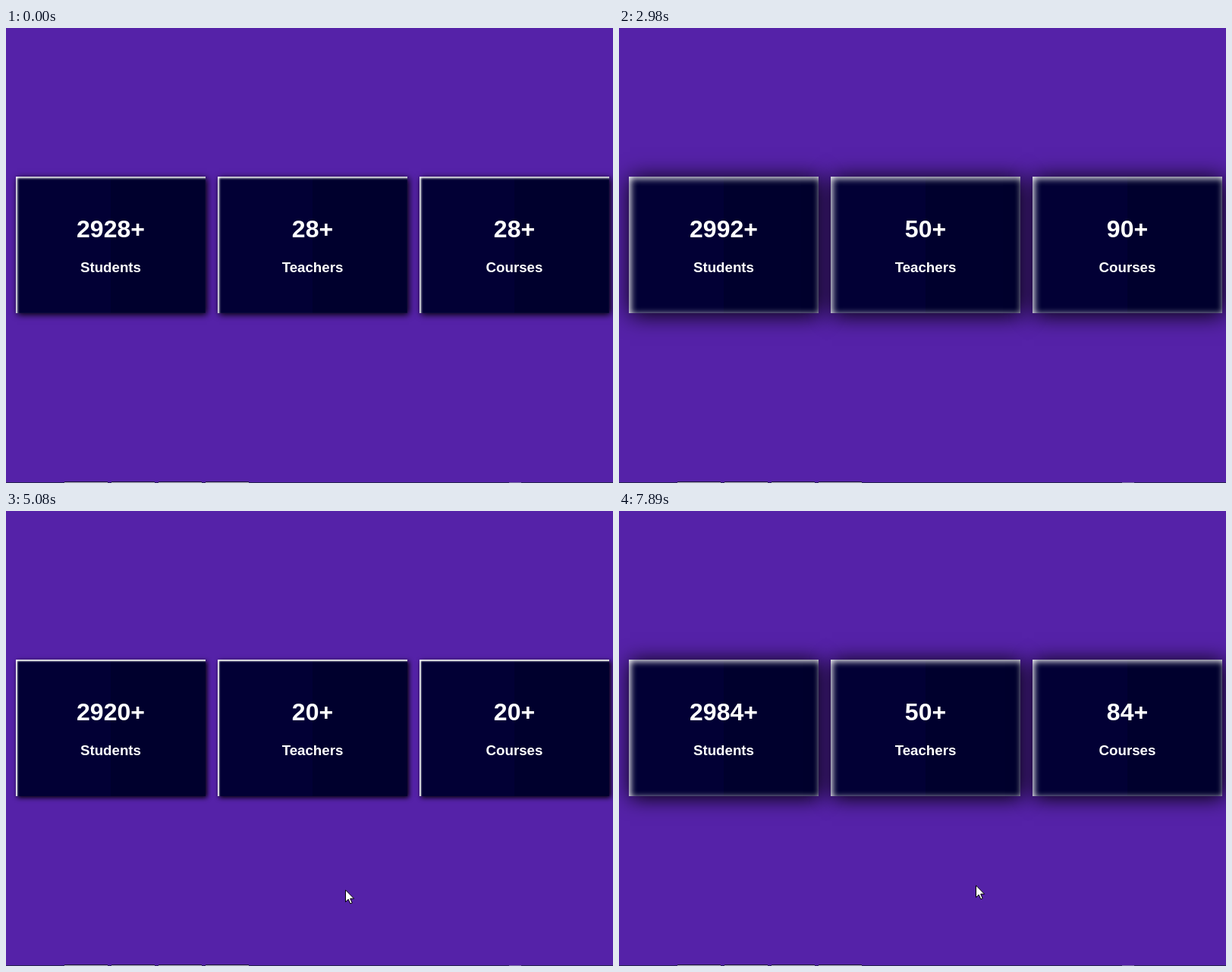
Write an HTML page that moves like this. It is 800 px wide and 600 px high and loops after 8 s.

```html
<!DOCTYPE html>
<html lang="en">
<head>
<meta charset="utf-8">
<title>Counter cards</title>
<style>
  html, body { margin: 0; width: 100%; height: 100%; overflow: hidden; background: #5522a8; }
  #stage { position: relative; width: 800px; height: 600px; overflow: hidden; background: #5522a8; }
  #stage > * { position: absolute; }
  .card {
    top: 196px; width: 250px; height: 180px;
    background: linear-gradient(90deg, #020035 50%, #00002d 50%);
    color: #fff; text-align: center;
    font-family: "Liberation Sans", Arial, sans-serif; font-weight: bold;
  }
  .card div { position: absolute; left: 0; width: 100%; }
  .num { top: 51px; font-size: 32px; line-height: 37px; }
  .label { top: 109px; font-size: 18.72px; line-height: 21px; }
  #menu {
    left: 660px; top: 327px; width: 160px; padding: 3px 0;
    border: 1px solid #bdbdc4; background: #fff; color: #222;
    box-shadow: 2px 2px 3px rgba(0, 0, 0, .45);
    font: 11.4px/24px "Open Sans", "Noto Sans", sans-serif;
  }
  #menu div { height: 24px; padding-left: 24px; white-space: nowrap; }
  #menu .off { color: #a0a0a0; }
  #menu .hover { background: #dadce0; }
  #menu hr { margin: 5px 0; border: 0; height: 1px; background: #e6e6ea; }
  #ring { width: 24px; height: 24px; border-radius: 50%; background: rgba(240, 232, 50, .78); }
  #bar { left: 0; top: 599px; width: 800px; height: 1px; background: #26264e; }
  .tab { top: 598px; width: 57px; height: 1px; background: #1c1838; border-bottom: 1px solid #b4b2c6; }
</style>
</head>
<body>
<div id="stage">
  <div id="bar"></div>
  <div id="menu">
    <div class="off">Back</div>
    <div class="off">Forward</div>
    <div id="reload">Reload</div>
    <hr>
    <div>Save as...</div>
    <div>Print...</div>
    <div>Cast...</div>
    <div>Translate to English</div>
    <hr>
    <div>View page source</div>
    <div>Inspect</div>
  </div>
  <div id="ring"></div>
  <svg id="cursor" width="14" height="21" viewBox="0 0 14 21">
    <path d="M.5 .8V16.5L4.2 13L6.8 18.8L9.2 17.8L6.7 12.1H11.6Z" fill="#fff" stroke="#000"/>
  </svg>
</div>
<script>
const LOOP = 8000, RELOAD = 4250;
const $ = id => document.getElementById(id);
const stage = $('stage'), menu = $('menu'), reload = $('reload');
const ring = $('ring'), cursor = $('cursor');

// [time, progress of the count]
const COUNT = [
  [0, 28.5], [1610, 64.5], [2980, 92.5], [3360, 100], [RELOAD - 1, 100],
  [RELOAD, 0], [4300, 0], [5080, 20.5], [5990, 40.5], [7890, 84.5], [LOOP, 86]
];
// [time, x, y]
const PATH = [
  [3000, 800, 540], [3180, 735, 430], [3360, 660, 327], [3640, 660, 327],
  [3780, 700, 350], [3950, 744, 397], [4150, 744, 397], [4450, 690, 455],
  [4800, 545, 517], [5080, 447, 499], [5300, 452, 521], [5600, 466, 505],
  [5800, 470, 493], [LOOP, 470, 493]
];

function sample(keys, t) {
  let i = 1;
  while (i < keys.length - 1 && t >= keys[i][0]) i++;
  const a = keys[i - 1], b = keys[i];
  const k = Math.min(1, Math.max(0, (t - a[0]) / (b[0] - a[0])));
  return a.slice(1).map((v, j) => v + (b[j + 1] - v) * k);
}

function add(cls, x, html = '') {
  const el = document.createElement('div');
  el.className = cls;
  el.style.left = x + 'px';
  el.innerHTML = html;
  stage.insertBefore(el, menu);
  return el;
}

for (let i = 0; i < 4; i++) add('tab', 77 + i * 62);
add('tab', 663).style.cssText += 'width:16px;background:none;border-color:#77739a';

const cards = [['Students', 2900, 3000], ['Teachers', 0, 50], ['Courses', 0, 90]]
  .map(([label, from, to], i) => {
    const el = add('card', 13 + i * 266,
      `<div class="num"></div><div class="label">${label}</div>`);
    return { el, num: el.firstChild, from, to };
  });

const show = (el, on) => { el.style.display = on ? '' : 'none'; };
const place = (el, x, y) => { el.style.transform = `translate(${x}px, ${y}px)`; };
const within = (t, a, b) => t >= a && t < b;

function draw(t) {
  const [p] = sample(COUNT, t);
  const n = Math.floor(p / 2) * 2;
  const shadow = `2px 2px ${p * .3}px #000, inset 2px 2px ${p * .1}px #fff`;
  for (const c of cards) {
    c.num.textContent = Math.min(c.to, c.from + n) + '+';
    c.el.style.boxShadow = shadow;
  }

  const [x, y] = sample(PATH, t).map(Math.round);
  show(cursor, t >= 3000);
  place(cursor, x, y);
  show(ring, within(t, 3580, 3660) || within(t, 4020, 4150));
  place(ring, x - 12, y - 12);
  show(menu, within(t, 3660, 4150));
  reload.className = y >= 379 ? 'hover' : '';
}

cursor.style.left = cursor.style.top = ring.style.left = ring.style.top = 0;
const start = performance.now();
function tick() {
  draw((performance.now() - start) % LOOP);
  requestAnimationFrame(tick);
}
tick();
</script>
</body>
</html>
```
